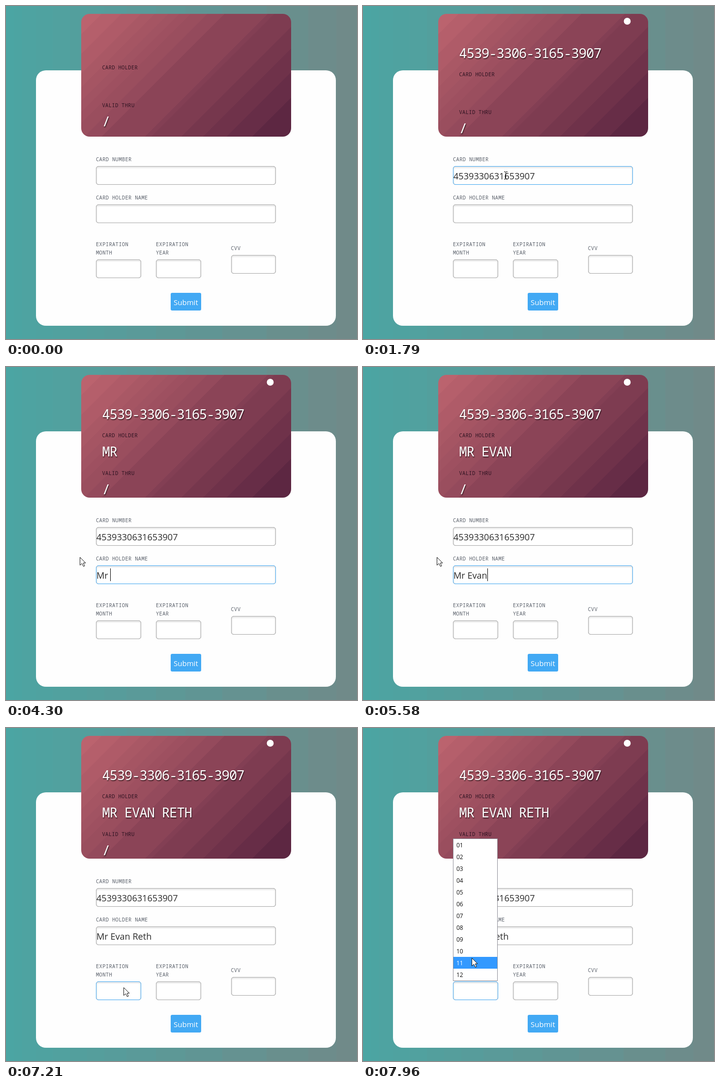
An HTML page with a canvas for the animation above (8 s loop, 714x678 px).

```html
<!DOCTYPE html>
<html lang="en">
<head>
<meta charset="utf-8">
<title>Card form</title>
<style>
  html, body { margin: 0; width: 100%; height: 100%; overflow: hidden; background: #5f9691; }
  canvas { display: block; }
</style>
</head>
<body>
<canvas id="stage" width="714" height="678"></canvas>
<script>
const ctx = document.getElementById('stage').getContext('2d');
const LOOP = 8000;
const SANS = '"Open Sans", "Noto Sans", sans-serif';
const MONO = '"Noto Sans Mono", "DejaVu Sans Mono", monospace';
const BLUE = '#42a9f4';
const NUMBER = '4539330631653907';
const NAME = 'Mr Evan Reth';

// [x, y, width, height, takes text]
const FIELDS = [
  [183, 326, 366, 38, true],
  [183, 404, 366, 38, true],
  [183, 516, 92, 38, false],
  [305, 516, 92, 38, false],
  [458, 507, 91, 38, true]
];
const LABELS = [
  ['CARD NUMBER', 183, 316], ['CARD HOLDER NAME', 183, 394],
  ['EXPIRATION', 183, 489], ['MONTH', 183, 506],
  ['EXPIRATION', 305, 489], ['YEAR', 305, 506], ['CVV', 457.5, 497]
];
const PASTE = 1370, OPEN = 7260;
const KEYS = [4050, 4220, 4300, 4480, 4660, 5350, 5580, 5760, 5990, 6210, 6430, 6560];
const CARET_ON = [[960, 1790], [2210, 3100], [3640, 5180], [5350, 7030]];

// pointer moves: start, end, steps, waypoints
const MOVES = [
  [80, 700, 14, [[616, 676], [485, 520], [290, 343]]],
  [1790, 2210, 9, [[290, 343], [280, 415]]],
  [2970, 3210, 5, [[280, 415], [152, 388]]],
  [3370, 3370, 1, [[152, 388], [150, 387]]],
  [6700, 7030, 9, [[150, 387], [225, 460], [281, 512], [239, 528]]],
  [7660, 7960, 8, [[239, 528], [221, 468]]]
];

function along(points, u) {
  const s = u * (points.length - 1);
  const i = Math.min(Math.floor(s), points.length - 2);
  const f = s - i, a = points[i], b = points[i + 1];
  return [a[0] + (b[0] - a[0]) * f, a[1] + (b[1] - a[1]) * f];
}

function pointerAt(t) {
  const move = MOVES.filter(m => t >= m[0]).pop();
  if (!move) return null;
  const [from, to, steps, points] = move;
  const u = t >= to ? 1 : Math.floor((t - from) / (to - from) * (steps - 1) + 1) / steps;
  return along(points, u * u * (3 - 2 * u)).map(Math.round);
}

function rounded(x, y, w, h, r) {
  ctx.beginPath();
  ctx.roundRect(x, y, w, h, r);
}

function text(str, x, y, font, color) {
  ctx.font = font;
  ctx.fillStyle = color;
  ctx.fillText(str, x, y);
}

function mono(str, x, y, size, pitch, color, weight = 400) {
  ctx.font = `${weight} ${size}px ${MONO}`;
  ctx.letterSpacing = '0px';
  ctx.letterSpacing = (pitch - ctx.measureText('0').width).toFixed(2) + 'px';
  ctx.fillStyle = color;
  ctx.fillText(str, x, y);
  ctx.letterSpacing = '0px';
}

// hard-edged steps sampled from a two-colour ramp
function bands(gradient, edges, c1, c2) {
  const first = edges[0], span = edges[edges.length - 1] - first;
  for (let i = 0; i + 1 < edges.length; i++) {
    const a = (edges[i] - first) / span, b = (edges[i + 1] - first) / span;
    const mix = c1.map((c, k) => Math.round(c + (c2[k] - c) * (a + b) / 2));
    gradient.addColorStop(a, `rgb(${mix})`);
    gradient.addColorStop(b, `rgb(${mix})`);
  }
  return gradient;
}

const backdrop = bands(ctx.createLinearGradient(0, 0, 714, 0),
  [0, 16, 33, 61, 95, 130, 165, 200, 245, 305, 365, 440, 530, 615, 672, 714],
  [75, 165, 163], [113, 137, 136]);
const cardFill = bands(ctx.createLinearGradient(153, 16, 491.5, 354.5),
  [169, 210, 250, 290, 318, 346, 368, 391, 425, 460, 548, 561, 622, 666, 714, 766, 846],
  [190, 101, 111], [87, 35, 63]);

function drawCard(t) {
  ctx.fillStyle = cardFill;
  rounded(153, 16, 427, 250, 17);
  ctx.fill();
  const filled = t >= PASTE;
  const dy = filled ? 14 : 0;
  const ink = 'rgba(30, 10, 25, 0.85)';
  mono('CARD HOLDER', 195.5, 129 + dy, 10.5, 6.6, ink, 300);
  mono('VALID THRU', 195.5, 206 + dy, 10.5, 6.6, ink, 300);

  ctx.save();
  ctx.shadowColor = 'rgba(0, 0, 0, 0.6)';
  ctx.shadowBlur = 2;
  ctx.shadowOffsetX = 1;
  ctx.shadowOffsetY = 2;
  mono('/', 195.5, 245 + dy, 28, 15.2, '#fff');
  if (filled) {
    mono(NUMBER.match(/.{4}/g).join('-'), 195.5, 106, 27, 15.2, '#fff');
    mono(typed(t).toUpperCase(), 195.5, 182, 27, 15.2, '#fff');
  }
  ctx.restore();
  if (filled) {
    ctx.fillStyle = '#fff';
    ctx.beginPath();
    ctx.arc(537.5, 31, 7, 0, 7);
    ctx.fill();
  }
}

function typed(t) {
  return NAME.slice(0, KEYS.filter(k => t >= k).length);
}

function drawField([x, y, w, h], focused) {
  ctx.save();
  rounded(x, y, w, h, 5);
  ctx.fillStyle = '#fff';
  ctx.fill();
  ctx.clip();
  ctx.shadowColor = 'rgba(0, 0, 0, 0.35)';
  ctx.shadowBlur = 3;
  ctx.shadowOffsetY = 1.5;
  ctx.strokeStyle = '#aaa';
  ctx.lineWidth = 1;
  rounded(x + 0.5, y + 0.5, w - 1, h - 1, 4.5);
  ctx.stroke();
  ctx.restore();
  ctx.strokeStyle = focused ? BLUE : '#ababab';
  ctx.lineWidth = 1;
  rounded(x + 0.5, y + 0.5, w - 1, h - 1, 4.5);
  ctx.stroke();
}

function drawForm(t) {
  const focus = t < 960 ? -1 : t < 2500 ? 0 : t < 7210 ? 1 : 2;
  LABELS.forEach(([str, x, y]) => mono(str, x, y, 10.5, 6.6, '#5c626c', 300));
  FIELDS.forEach((f, i) => drawField(f, i === focus));

  const values = [t >= PASTE ? NUMBER : '', typed(t)];
  const font = '18.1px ' + SANS;
  values.forEach((v, i) => text(v, 184, 353 + 78 * i, font, '#2b2b2b'));
  if (focus >= 0 && focus < 2 && CARET_ON.some(([a, b]) => t >= a && t < b)) {
    ctx.font = font;
    ctx.fillStyle = '#000';
    ctx.fillRect(184 + Math.round(ctx.measureText(values[focus]).width), 332 + 78 * focus, 1, 26);
  }

  ctx.fillStyle = BLUE;
  rounded(335, 584, 62, 36, 3);
  ctx.fill();
  text('Submit', 341, 609, '15px ' + SANS, '#fff');
}

function drawMenu(pointer) {
  ctx.fillStyle = '#8e8e98';
  ctx.fillRect(183, 225, 91, 290);
  ctx.fillStyle = '#fff';
  ctx.fillRect(184, 226, 89, 288);
  const hover = Math.floor((pointer[1] - 226) / 24);
  for (let i = 0; i < 12; i++) {
    if (i === hover) {
      ctx.fillStyle = '#3399ff';
      ctx.fillRect(184, 226 + 24 * i, 89, 24);
    }
    text(String(i + 1).padStart(2, '0'), 190, 243 + 24 * i, '12px ' + SANS, i === hover ? '#fff' : '#111');
  }
}

function drawPointer([x, y], menuOpen) {
  const overText = !menuOpen && FIELDS.some(([fx, fy, w, h, takesText]) =>
    takesText && x >= fx && x < fx + w && y >= fy && y < fy + h);
  ctx.fillStyle = '#000';
  if (overText) {
    ctx.fillRect(x, y - 7, 1, 14);
    for (const yy of [y - 8, y + 7]) {
      ctx.fillRect(x - 3, yy, 3, 1);
      ctx.fillRect(x + 1, yy, 3, 1);
    }
    return;
  }
  const shape = [[0, 0], [0, 16], [4, 12.5], [7, 18.5], [9.5, 17.5], [6.8, 11.5], [11.5, 11.5]];
  ctx.beginPath();
  shape.forEach(([dx, dy]) => ctx.lineTo(x + dx + 0.5, y + dy + 0.5));
  ctx.closePath();
  ctx.fillStyle = '#fff';
  ctx.fill();
  ctx.strokeStyle = '#111';
  ctx.lineWidth = 1;
  ctx.stroke();
}

function draw(t) {
  ctx.fillStyle = backdrop;
  ctx.fillRect(0, 0, 714, 678);
  ctx.fillStyle = '#fefefe';
  rounded(61, 131, 610, 520, 20);
  ctx.fill();
  drawCard(t);
  drawForm(t);
  const pointer = pointerAt(t);
  const menuOpen = t >= OPEN;
  if (menuOpen) drawMenu(pointer);
  if (pointer) drawPointer(pointer, menuOpen);
}

const start = performance.now();
function tick() {
  draw((performance.now() - start) % LOOP);
  requestAnimationFrame(tick);
}
tick();
</script>
</body>
</html>
```
